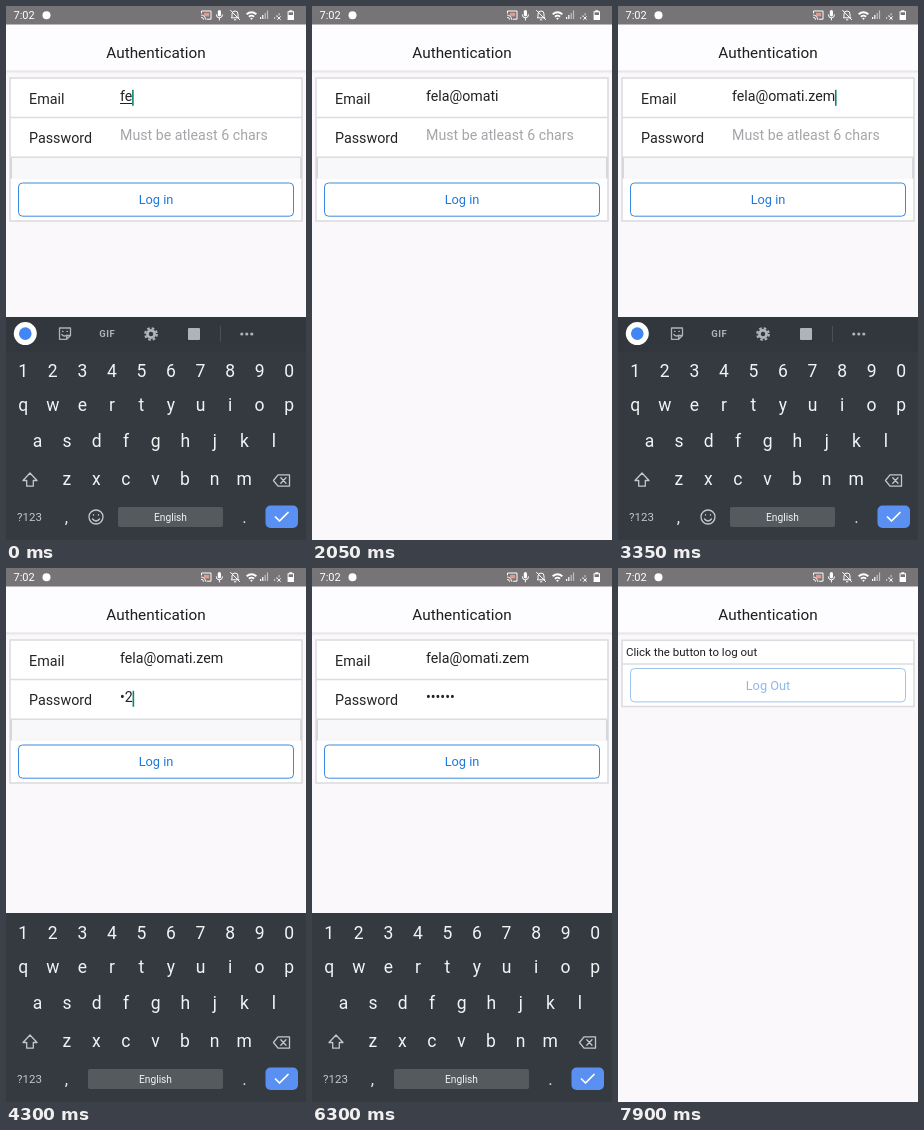
Recreate the animation shown at these times as an HTML page. Size 300 px wide and 534 px high, loop 7.95 s.

```html
<!DOCTYPE html>
<html lang="en">
<head>
<meta charset="utf-8">
<title>Authentication</title>
<style>
html, body { margin: 0; width: 100%; height: 100%; overflow: hidden; background: #faf8fb; }
svg { display: block; width: 300px; height: 534px; font-family: Roboto, "Liberation Sans", sans-serif; }
text { white-space: pre; }
.mid { text-anchor: middle; }
.line { fill: none; stroke-width: 1.3; stroke-linecap: round; stroke-linejoin: round; }
.btn rect { fill: #fff; stroke: #3b8ae0; stroke-width: 1; }
.btn text { fill: #1f78dc; font-size: 12.8px; }
</style>
</head>
<body>
<svg viewBox="0 0 300 534">
  <rect width="300" height="534" fill="#faf8fb"/>

  <g id="header">
    <rect y="18" width="300" height="47" fill="#fdfcfe"/>
    <rect y="64.5" width="300" height="1.3" fill="#e2e0e4"/>
    <rect y="65.8" width="300" height="1.4" fill="#f1eff3"/>
    <text class="mid" x="150" y="51.5" font-size="15.3" fill="#1d1d20">Authentication</text>
  </g>

  <g id="status">
    <rect width="300" height="18.5" fill="#777477"/>
    <g fill="#fff">
      <text x="7.5" y="13.4" font-size="11">7:02</text>
      <circle cx="40.5" cy="9.3" r="4"/>
      <rect x="211.8" y="4" width="3.2" height="6.4" rx="1.6"/>
      <path d="M240 7.5q5.5-4.5 11 0l-1.3 1.5q-4.2-3.4-8.4 0zM242.3 10q3.2-2.5 6.4 0l-1.2 1.4q-2-1.6-4 0zM244.2 12.3q1.3-1 2.6 0l-1.3 1.7z"/>
      <path d="M254 13v-2h1.2v2zM256.2 13v-4h1.2v4z"/>
      <path d="M258.6 13v-6h1.2v6zM260.9 13v-8.5h1.2v8.5zM268 13v-2h1.2v2zM270.2 9h1.2v2h-1.2zM272.5 7h1.2v2.5h-1.2z" opacity=".55"/>
      <path d="M283.3 4.2h3v1h1.7v8.8h-6.4V5.2h1.7z"/>
    </g>
    <rect x="282.6" y="6.3" width="4.4" height="2.7" fill="#777477"/>
    <rect x="198" y="6.8" width="5.2" height="3.6" fill="#e39a8a"/>
    <g class="line" stroke="#fff" style="stroke-width:1">
      <path d="M195.5 7V5h9.5v8.2h-4M195.5 9a4 4 0 0 1 4 4.2M195.5 11.3a2 2 0 0 1 2 2"/>
      <path d="M210.3 8.8a3.1 3.1 0 0 0 6.2 0M213.4 12v2"/>
      <path d="M225.6 11.8h7.4l-1-1.2V8a3 3 0 0 0-6 0v2.6zM228.4 13.8h1.4M224.6 4.4l9 9.2"/>
      <path d="M271.6 10.7l2.8 2.8M274.4 10.7l-2.8 2.8"/>
    </g>
  </g>

  <g id="login">
    <rect x="4" y="72" width="292" height="143" fill="#fff" stroke="#dcdde2" stroke-width="1.6"/>
    <rect x="4.5" y="151" width="291" height="22" fill="#f8f7fa"/>
    <path d="M4 111.5h292M4 151.2h292" stroke="#dadce1" stroke-width="1.4"/>
    <path d="M5 152v20.5M295 152v20.5" stroke="#cfd0d5" stroke-width="1.6"/>
    <g font-size="14.3" fill="#242427">
      <text x="23" y="97.5">Email</text>
      <text x="23" y="136.6">Password</text>
    </g>
    <g font-size="14.2" fill="#222226">
      <text id="email" x="114" y="95"></text>
      <text id="pass" x="114" y="134"></text>
      <text id="hint" x="114" y="134.3" fill="#a6a5a9">Must be atleast 6 chars</text>
    </g>
    <rect id="under" x="114" y="97" height="1" fill="#222226"/>
    <rect id="caret" width="1.6" height="16" fill="#0b8577"/>
    <g id="loginBtn" class="btn">
      <rect x="12.5" y="177" width="275" height="33.2" rx="4"/>
      <text class="mid" x="150" y="198.2">Log in</text>
    </g>
  </g>

  <g id="logout">
    <rect x="4" y="72.3" width="292" height="66.2" fill="#fff" stroke="#dcdde2" stroke-width="1.6"/>
    <path d="M4 96h292" stroke="#dadce1" stroke-width="1.4"/>
    <text x="8" y="88.4" font-size="11.5" fill="#1d1d20">Click the button to log out</text>
    <g id="logoutBtn" class="btn">
      <rect x="12.5" y="100.5" width="275" height="33.4" rx="4"/>
      <text class="mid" x="150" y="122">Log Out</text>
    </g>
  </g>

  <g id="board">
    <rect y="345" width="300" height="220" fill="#343a40"/>
    <g id="tools">
      <rect y="311" width="300" height="34.5" fill="#31373c"/>
      <circle cx="19.3" cy="327.6" r="11.5" fill="#fff"/>
      <circle cx="19.3" cy="327.6" r="6.3" fill="#4285f4"/>
      <g class="line" stroke="#aeb3b8">
        <path d="M53.5 322h11v7.5l-3.8 3.8h-7.200zM64.500 329.500h-3.800v3.800M55.800 328.500q2.200 2.600 4.700.7M56.600 325.400h.4M61 325.400h.4"/>
        <circle cx="145" cy="328" r="3.6" style="stroke-width:2.8"/>
        <circle cx="145" cy="328" r="5.8" style="stroke-width:2.2;stroke-linecap:butt" stroke-dasharray="2.6 1.955"/>
      </g>
      <text class="mid" x="101.300" y="331" font-size="9.500" font-weight="700" letter-spacing=".6" fill="#aeb3b8">GIF</text>
      <rect x="182" y="322" width="12" height="12" rx="1" fill="#aeb3b8"/>
      <path d="M214.500 320v16" stroke="#4a5056"/>
      <g fill="#aeb3b8"><circle cx="235.800" cy="328" r="1.600"/><circle cx="240.800" cy="328" r="1.600"/><circle cx="245.800" cy="328" r="1.600"/></g>
    </g>
    <rect id="dotKey" x="225" y="497.500" width="26" height="28.500" rx="3" fill="#4a5056"/>
    <g id="digits"></g>
    <g id="letters"></g>
    <g id="symbols"></g>
    <g class="line" stroke="#c3c7ca">
      <path id="shift" d="M24 467l-7 7.500h3.700v5.700h6.600v-5.700h3.700z"/>
      <path d="M267.500 474.500l4.500-5.700h11.500v11.400h-11.500zM274.800 471.800l5.200 5.400M280 471.800l-5.200 5.400"/>
      <g id="emoji"><circle cx="90" cy="511" r="7"/><path d="M86.500 513q3.500 4 7 0M87.500 508.700v.4M92.500 508.700v.4"/></g>
    </g>
    <rect id="space" y="501" height="20" rx="2" fill="#555a5f"/>
    <text id="lang" class="mid" y="514.800" font-size="10.200" fill="#f2f3f4">English</text>
    <text id="mode" class="mid" x="23.500" y="515.200" font-size="11.500" fill="#c3c7ca"></text>
    <g class="mid" font-size="17" fill="#e6e8ea"><text x="60.500" y="517">,</text><text x="238.500" y="517">.</text></g>
    <rect x="259.500" y="499.500" width="32.500" height="22.500" rx="5" fill="#5b90f3"/>
    <path class="line" d="M269.500 511l4 4 8.500-8.500" stroke="#fff" style="stroke-width:1.700"/>
  </g>
</svg>
<script>
const LOOP = 7950, STEP = 50, LEFT = 114, PITCH = 29.55;
const ADDRESS = 'fela@omati.zem';
// [time, letters typed]
const EMAIL = [[0, 2], [200, 3], [450, 4], [1050, 5], [1300, 6], [1400, 7], [1500, 8],
  [1600, 9], [1700, 10], [2950, 11], [3150, 12], [3200, 13], [3350, 14]];
const PASS = [[0, ''], [3850, '1'], [4100, '•2'], [4350, '••3'], [4600, '•••4'],
  [4850, '••••5'], [5100, '•••••6'], [5700, '••••••']];

const $ = Object.fromEntries([...document.querySelectorAll('[id]')].map(e => [e.id, e]));
const show = (el, on) => el.setAttribute('display', on ? 'inline' : 'none');
const set = (el, attrs) => { for (const k in attrs) el.setAttribute(k, attrs[k]); };
const last = (table, t) => table.filter(s => s[0] <= t).pop();
const within = (t, a, b) => t >= a && t < b;
const ramp = (t, a, b) => Math.min(1, Math.max(0, (t - a) / (b - a)));

function row(parent, chars, x, y) {
  [...chars].forEach((c, i) => {
    const key = document.createElementNS('http://www.w3.org/2000/svg', 'text');
    set(key, { class: 'mid', x: x + i * PITCH, y, 'font-size': 17.5, fill: '#f2f3f4' });
    key.textContent = c;
    parent.append(key);
  });
}
row($.digits, '1234567890', 17.2, 370.6);
row($.letters, 'qwertyuiop', 17.2, 404.5);
row($.letters, 'asdfghjkl', 31.5, 441.3);
row($.letters, 'zxcvbnm', 60.8, 479);
row($.symbols, '+×÷=/_<>[]', 17.2, 404.5);
row($.symbols, '!@#$%^&*()', 17.2, 441.3);
row($.symbols, '-\'":;,?', 60.8, 479);

// 0 = keyboard fully up, 1 = gone
function hidden(t) {
  if (t < 2500) return ramp(t, 1800, 2000) ** 3;
  if (t < 6700) return (1 - ramp(t, 2500, 2800)) ** 3;
  return ramp(t, 6700, 6900) ** 3;
}

function drawFields(t) {
  const [mailTime, count] = last(EMAIL, t), [passTime, secret] = last(PASS, t);
  $.email.textContent = ADDRESS.slice(0, count);
  $.pass.textContent = secret;
  show($.hint, !secret);

  const mailWidth = $.email.getComputedTextLength();
  show($.under, t < 1050);
  set($.under, { width: mailWidth });

  const inPass = t >= 3600;
  const since = t - (inPass ? Math.max(3600, passTime) : Math.max(t >= 2550 ? 2550 : 0, mailTime));
  const width = inPass ? (secret ? $.pass.getComputedTextLength() : 0) : mailWidth;
  show($.caret, !within(t, 1800, 2550) && since % 1000 < 500);
  set($.caret, { x: LEFT + width - 0.2, y: inPass ? 122.8 : 83.8 });
  $.loginBtn.style.opacity = 1 - 0.8 * (ramp(t, 5200, 5350) - ramp(t, 5500, 5750));
}

function drawBoard(t) {
  const gone = hidden(t), secure = t >= 3600, symbols = within(t, 850, 1200);
  show($.board, gone < 1);
  set($.board, { transform: `translate(0 ${28 * gone})`, opacity: 1 - gone });
  show($.tools, !secure);
  show($.emoji, !secure && !symbols);
  show($.letters, !symbols);
  show($.symbols, symbols);
  show($.shift, !symbols);
  show($.dotKey, within(t, 2950, 3000));
  $.mode.textContent = symbols ? 'ABC' : '?123';
  const x = secure ? 82 : 112;
  set($.space, { x, width: 217 - x });
  set($.lang, { x: (x + 217) / 2 });
}

function draw(t) {
  const signedIn = t >= 6700;
  show($.login, !signedIn);
  show($.logout, signedIn);
  if (!signedIn) drawFields(t);
  $.logoutBtn.style.opacity = 1 - 0.5 * ramp(t, 7700, 7900);
  drawBoard(t);
}

const start = performance.now();
function tick() {
  const t = (performance.now() - start) % LOOP;
  draw(Math.floor(t / STEP) * STEP);
  requestAnimationFrame(tick);
}
tick();
</script>
</body>
</html>
```
